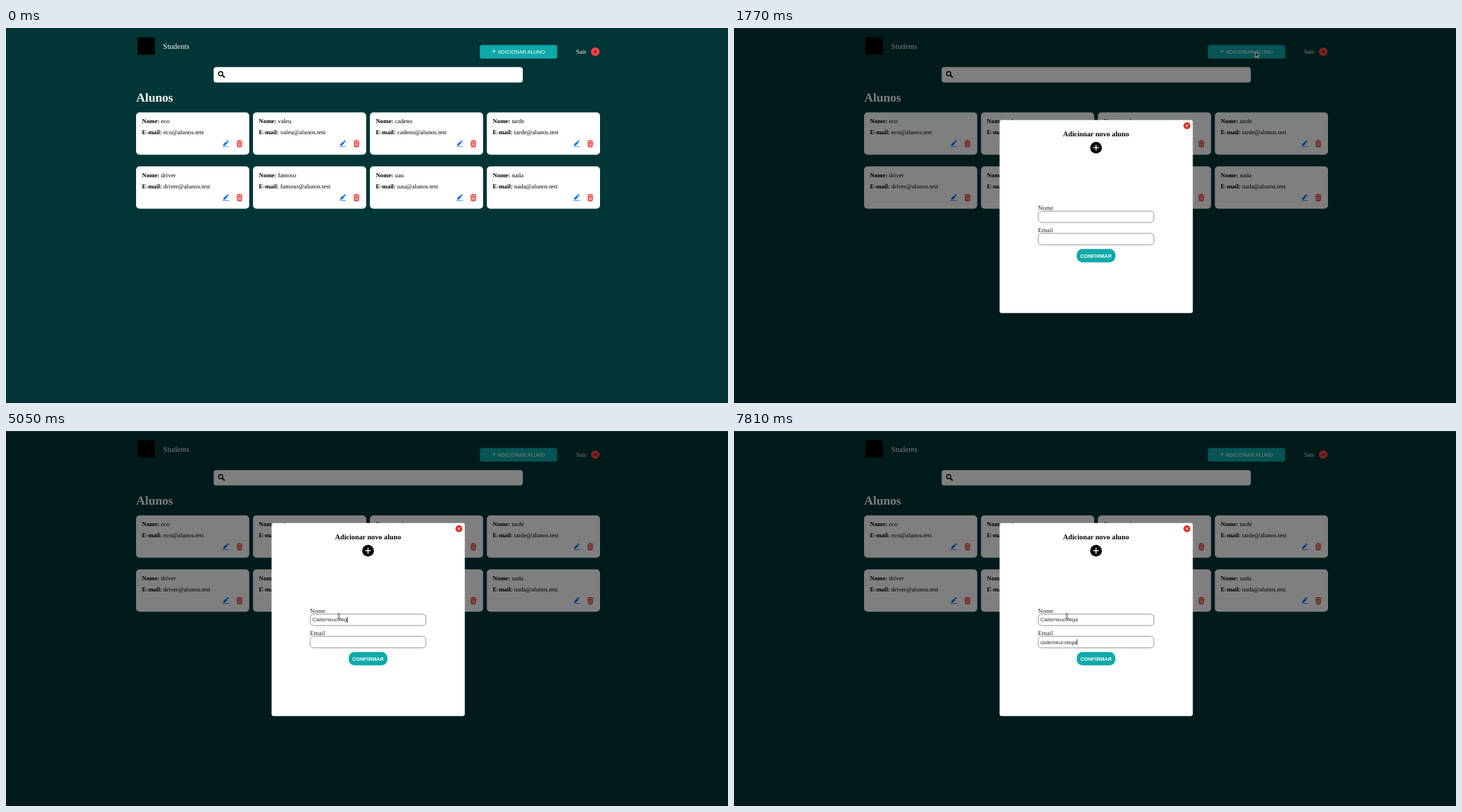
An HTML page for the animation above (8 s loop, 1038 px wide and 540 px high).

```html
<!DOCTYPE html>
<html lang="pt">
<head>
<meta charset="utf-8">
<title>Alunos</title>
<style>
html, body { margin: 0; width: 100%; height: 100%; overflow: hidden; background: #023535; }
svg { display: block; width: 100vw; height: 100vh; }
text { font-family: "Liberation Serif", "Times New Roman", serif; text-rendering: geometricPrecision; white-space: pre; }
.sans { font-family: "Liberation Sans", Arial, sans-serif; }
.item { font: 600 6.9px "Open Sans", "Noto Sans", sans-serif; fill: #fff; }
.b { font-weight: 700; }
</style>
</head>
<body>
<svg id="stage" viewBox="0 0 1038 540" preserveAspectRatio="none"></svg>
<script>
const LOOP = 8000;
const TEAL = '#0fa9a9';
const DOMAIN = '@alunos.test';
const students = ['eco', 'valeu', 'cadeno', 'tarde', 'driver', 'famoso', 'uau', 'nada'];

const rect = (x, y, w, h, r, fill, extra = '') =>
  `<rect x="${x}" y="${y}" width="${w}" height="${h}" rx="${r}" fill="${fill}" ${extra}/>`;
const text = (x, y, size, fill, str, cls = '', extra = '') =>
  `<text x="${x}" y="${y}" font-size="${size}" fill="${fill}" class="${cls}" ${extra}>${str}</text>`;
const cross = (x, y, r, color, width) =>
  `<path d="M${x - r} ${y - r}l${2 * r} ${2 * r}m0 ${-2 * r}l${-2 * r} ${2 * r}" stroke="${color}" stroke-width="${width}"/>`;
const plus = (x, y, r, color, width) =>
  `<path d="M${x - r} ${y}h${2 * r}M${x} ${y - r}v${2 * r}" stroke="${color}" stroke-width="${width}"/>`;
const disc = (x, y, r, fill) => `<circle cx="${x}" cy="${y}" r="${r}" fill="${fill}"/>`;

const pencil = (x, y) => `<g transform="translate(${x} ${y})" fill="#0d6efd">
  <path d="M-3.6 3.1v-2.1l4.1-4.1 2.1 2.1-4.1 4.1zM1.1-3.7l1-1q.4-.3.8 0l1.2 1.2q.4.4 0 .8l-1 1z"/>
  <path d="M-4.6 3.9h9.2v.9h-9.2z" opacity=".8"/></g>`;
const trash = (x, y) => `<g transform="translate(${x} ${y})">
  <path d="M-4.5-4h2.6l.6-1.2h2.6l.6 1.2h2.6v1.2h-9zM-3.9-2.2h7.8l-.4 6.4q-.1 1.1-1.2 1.1h-4.6q-1.1 0-1.2-1.1z" fill="#e8413c"/>
  <path d="M-1.8-.9l.15 4.8M0-.9v4.8M1.8-.9l-.15 4.8" stroke="#fff" stroke-width=".7" fill="none"/></g>`;

function card(name, i) {
  const x = 187 + 168.1 * (i % 4), y = 121.5 + 77.7 * Math.floor(i / 4);
  const line = (dy, label, value) => text(x + 8.5, y + dy, 8.88, '#000',
    `<tspan class="b">${label}</tspan> ${value}`);
  return rect(x, y, 162.7, 61, 5, '#fff') + line(15.8, 'Nome:', name) +
    line(31.6, 'E-mail:', name + DOMAIN) + pencil(x + 129, y + 45) + trash(x + 148.7, y + 44.9);
}

const field = y => rect(437.3, y, 166.4, 16.4, 5, '#fff', 'stroke="#8a8a8a" stroke-width=".9"');

const page = rect(0, 0, 1038, 540, 0, '#023535') +
  rect(189, 13.5, 25, 25, 0, '#000') +
  text(225.8, 29.8, 11.03, '#fff', 'Students') +
  rect(681.2, 24.5, 111.2, 19.4, 3, TEAL) + plus(701.5, 33.3, 2.8, '#fff', .7) +
  text(706.9, 36.7, 7.38, '#fff', 'ADICIONAR ALUNO', 'sans') +
  text(819.8, 36.9, 9, '#fff', 'Sair') +
  disc(847.2, 34.1, 6.2, '#ef4444') + cross(847.2, 34.1, 1.9, '#3a1010', .9) +
  rect(298.5, 56.2, 444.5, 22.2, 4, '#fff') +
  '<g fill="none" stroke="#000"><circle cx="308.7" cy="65.7" r="3" stroke-width="1.4"/><path d="M310.9 67.9l3.5 3.5" stroke-width="2"/></g>' +
  text(187.3, 106, 17.6, '#fff', 'Alunos', 'b') +
  students.map(card).join('') +
  rect(0, 538.5, 1038, 1.5, 0, '#022a2b');

const modal = rect(0, 0, 1038, 540, 0, '#000', 'opacity=".5"') +
  rect(381.8, 132.4, 277.8, 278, 3, '#fff') +
  disc(651.2, 140.7, 5, '#cf3a31') + cross(651.2, 140.7, 1.6, '#fff', .9) +
  text(520.5, 156, 10.3, '#000', 'Adicionar novo aluno', 'b', 'text-anchor="middle"') +
  disc(520.5, 172.4, 8.4, '#000') + plus(520.5, 172.4, 4.2, '#fff', 1.4) +
  text(437, 261.6, 9, '#222', 'Nome') + field(263.7) +
  text(437, 293.8, 9, '#222', 'Email') + field(295.8) +
  rect(492.6, 318.2, 55.8, 19.2, 8.5, TEAL) +
  text(520.5, 330.5, 7.36, '#fff', 'CONFIRMAR', 'sans b', 'text-anchor="middle"') +
  text(440.4, 274.4, 7.42, '#333', '', 'sans', 'id="name"') +
  text(440.4, 306.5, 7.42, '#333', '', 'sans', 'id="email"') +
  rect(0, 0, .8, 8, 0, '#000', 'id="caret"') + '<g id="list"></g>';

const pointers = `<g id="pointer">
  <circle id="ring" r="7" fill="#f5e52a" opacity=".65"/>
  <path id="arrow" d="M0 0v8.2l1.9-1.7 1.3 2.9 1.3-.6-1.3-2.8h2.6z" fill="#111" stroke="#fff" stroke-width=".6"/>
  <path id="hand" d="M-.6 0q.9-.7 1.4.2v3l3.3.8q1 .4.8 1.5l-.6 3.4h-4.2l-2.4-3.3q-.1-1 1.7 0z" fill="#fff" stroke="#222" stroke-width=".5"/>
  <path id="beam" d="M-2.2-3.6h1.5l.7.4.7-.4h1.5M0-3.2v6.4M-2.2 3.6h1.5l.7-.4.7.4h1.5" fill="none" stroke="#222" stroke-width=".8"/>
</g>`;

document.getElementById('stage').innerHTML = page + `<g id="modal">${modal}</g>` +
  rect(0, 0, 1038, 1, 0, '#1c2e34') + pointers;
const el = id => document.getElementById(id);
const show = (id, on) => el(id).setAttribute('visibility', on ? 'visible' : 'hidden');

const typed = 'Cademeucolega';
const nameKeys = [2840, 3120, 3590, 3720, 3920, 3990, 4130, 4470, 4730, 4830, 4930, 5020, 5120];
const mailKeys = [6320, 6400, 6490, 6580, 6660, 6750, 6850, 7010, 7410, 7510, 7610, 7710, 7810];
const FADE = 170;

// Suggestion lists: time span, top edge, padding, entries; the last part may fade out.
const all = ['Valdemiro Torvani', 'Valdao', 'cadeno', 'cacau', 'valeu', 'tarde'];
const mails = ['cadeno' + DOMAIN, 'cacau' + DOMAIN];
const lists = [
  { from: 2510, to: 2910, top: 281, pad: 10.5, items: all },
  { from: 2910, to: 2980, top: 281, pad: 12, items: all.slice(0, 2) },
  { from: 2980, to: 3190, top: 281, pad: 12, items: all.slice(2, 4) },
  { from: 3190, to: 3920 + FADE, top: 281, pad: 10, items: ['cadeno'], fade: 3920 },
  { from: 6320, to: 6400, top: 313.3, pad: 8.7, items: mails },
  { from: 6400, to: 6660 + FADE, top: 313.3, pad: 10, items: mails.slice(0, 1), fade: 6660 }
];

// Pointer keys: time, x, y
const path = [[190, 930, 471], [940, 735.5, 44], [1560, 749.3, 34], [1840, 749.3, 34], [2440, 478.6, 266.8], [LOOP, 478.6, 266.8]];

function pointerAt(t) {
  const i = Math.max(1, path.findIndex(k => k[0] > t));
  const [t0, x0, y0] = path[i - 1], [t1, x1, y1] = path[i];
  const u = Math.min(1, Math.max(0, (t - t0) / (t1 - t0)));
  const e = u * u * (3 - 2 * u);
  return [x0 + (x1 - x0) * e, y0 + (y1 - y0) * e];
}

function drawPointer(t) {
  const step = 190 + Math.floor((t - 190) / 69) * 69;
  const [x, y] = pointerAt(step);
  el('pointer').setAttribute('transform', `translate(${x} ${y})`);
  const open = t >= 1770;
  const overButton = !open && x > 681 && x < 792 && y < 44;
  const overField = open && x > 437 && x < 604 && y > 263;
  const visible = t >= 190;
  show('hand', visible && overButton);
  show('beam', visible && overField);
  show('arrow', visible && !overButton && !overField);
  show('ring', (t >= 1600 && t < 1770) || (t >= 2440 && t < 2580));
}

function drawList(t) {
  const list = lists.find(l => t >= l.from && t < l.to);
  const box = el('list');
  if (!list) { box.innerHTML = ''; return; }
  const { top, pad, items, fade } = list;
  const h = pad + 20.2 * items.length;
  const p = Math.max(0, (t - (fade || LOOP)) / FADE);
  const cx = 520.3, cy = top + h / 2, s = 1 - .045 * p;
  box.setAttribute('opacity', 1 - p);
  box.setAttribute('transform', `translate(${cx} ${cy}) scale(${s}) translate(${-cx} ${-cy})`);
  box.innerHTML = rect(436.6, top, 167.4, h, 1, '#28292e') +
    items.map((s, i) => text(442.3, top + 17 + 20.2 * i, 6.9, '#fff', s, 'item')).join('');
}

function drawFields(t) {
  const count = keys => keys.filter(k => k <= t).length;
  el('name').textContent = typed.slice(0, count(nameKeys));
  el('email').textContent = typed.toLowerCase().slice(0, count(mailKeys));
  const inMail = t >= 5530;
  const active = el(inMail ? 'email' : 'name');
  const width = active.textContent ? active.getComputedTextLength() : 0;
  el('caret').setAttribute('x', 440.4 + width);
  el('caret').setAttribute('y', inMail ? 299.9 : 267.8);
  show('caret', t >= 2510 && !(t >= 6050 && t < 6320));
}

function draw(t) {
  el('modal').style.display = t >= 1770 ? '' : 'none';
  if (t >= 1770) { drawFields(t); drawList(t); }
  drawPointer(t);
}

const start = performance.now();
function tick() {
  draw((performance.now() - start) % LOOP);
  requestAnimationFrame(tick);
}
tick();
</script>
</body>
</html>
```
